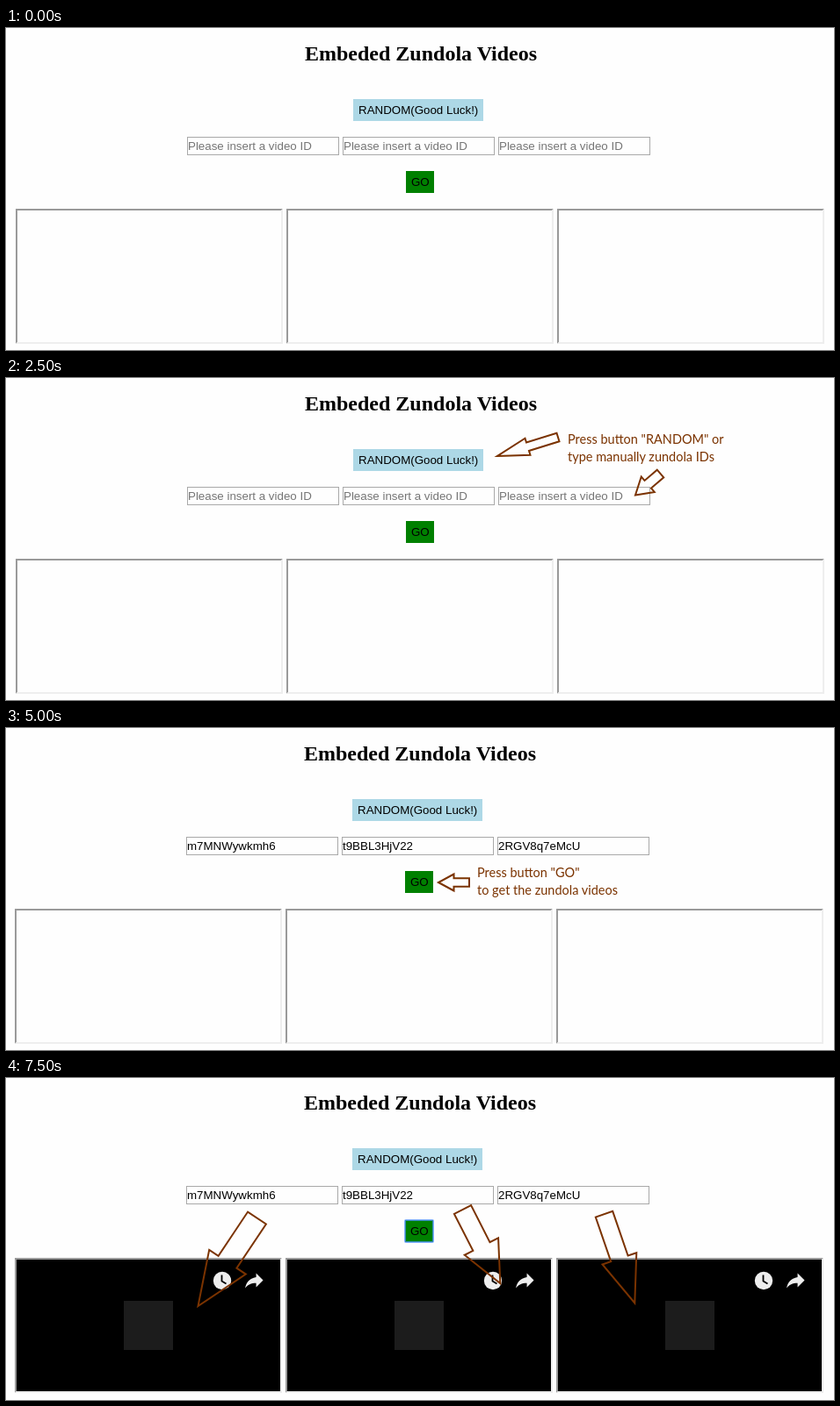
Recreate the animation shown at these times as an HTML page. Size 942 px wide and 367 px high, loop 10 s.

```html
<!DOCTYPE html>
<html lang="en">
<head>
<meta charset="utf-8">
<title>Embedded videos</title>
<style>
  html, body { margin: 0; width: 100%; height: 100%; overflow: hidden; background: #fefefe; }
  svg { display: block; width: 942px; height: 367px; }
  text { white-space: pre; }
  .title { font: bold 24px "Liberation Serif", "Times New Roman", serif; }
  .ui { font: 13.333px "Liberation Sans", Arial, sans-serif; }
  .hint { fill: #757575; }
  .note { font: 14.5px Lato, sans-serif; fill: #7b3300; }
  .arrow { fill: none; stroke: #7b3300; stroke-width: 2; }
  .field { fill: none; stroke: #a9a9a9; }
  .focus { fill: none; stroke: #4d90fe; stroke-width: 2; stroke-opacity: .7; }
  .icon { fill: #eee; }
  .hands { fill: none; stroke: #000; stroke-width: 1.8; }
</style>
</head>
<body>
<svg id="stage" viewBox="0 0 942 367"></svg>
<script>
const NS = "http://www.w3.org/2000/svg";
const STEP = 2500, STEPS = 4;
const IDS = ["m7MNWywkmh6", "t9BBL3HjV22", "2RGV8q7eMcU"];
const FRAME_W = 304, FRAME_H = 154, BORDER = 2, GAP = 4;
const FIELD_W = 173, FIELD_H = 21, BUTTON_H = 25;

function add(parent, tag, attrs = {}, content) {
  const el = document.createElementNS(NS, tag);
  for (const key in attrs) el.setAttribute(key, attrs[key]);
  if (content) el.textContent = content;
  return parent.appendChild(el);
}
const group = parent => add(parent, "g");
const label = (parent, x, y, cls, content) => add(parent, "text", { x, y, class: cls }, content);
const rect = (parent, x, y, width, height, attrs) => add(parent, "rect", { x, y, width, height, ...attrs });
const path = (parent, d, attrs) => add(parent, "path", { d, ...attrs });

function button(x, y, width, fill, content) {
  rect(page, x, y, width, BUTTON_H, { fill });
  label(page, x + 6, y + 17, "ui", content);
}

function note(parent, x, y, lines) {
  lines.forEach((line, i) => label(parent, x, y + 20 * i, "note", line));
}

// Block arrow: the head takes half the length and is twice as wide as the shaft
function arrow(parent, tipX, tipY, tailX, tailY, width) {
  const dx = tailX - tipX, dy = tailY - tipY, len = Math.hypot(dx, dy);
  const at = (along, side) => [
    tipX + dx * along - dy / len * side * width,
    tipY + dy * along + dx / len * side * width
  ];
  const points = [at(0, 0), at(.5, 1), at(.5, .5), at(1, .5), at(1, -.5), at(.5, -.5), at(.5, -1)];
  add(parent, "polygon", { points: points.join(" "), class: "arrow" });
}

// Dark top and left, light bottom and right, mitred corners
function insetFrame(x, y) {
  const b = BORDER, w = FRAME_W, h = FRAME_H, inner = h - 2 * b;
  path(page, `M${x} ${y + h}V${y}h${w}l${-b} ${b}H${x + b}v${inner}z`, { fill: "#9a9a9a" });
  path(page, `M${x} ${y + h}h${w}V${y}l${-b} ${b}v${inner}H${x + b}z`, { fill: "#eee" });
}

function player(x, y) {
  const mark = 56;
  rect(players, x + BORDER, y + BORDER, FRAME_W - 2 * BORDER, FRAME_H - 2 * BORDER);
  rect(players, x + (FRAME_W - mark) / 2, y + (FRAME_H - mark) / 2, mark, mark, { fill: "#1c1c1c" });
  add(players, "circle", { cx: x + 236, cy: y + 26, r: 10.2, class: "icon" });
  path(players, `M${x + 235.5} ${y + 19.5}v7l5 3`, { class: "hands" });
  path(players, "M14 9V5l7 7-7 7v-4.1c-5 0-8.5 1.6-11 5.1 1-5 4-10 11-11z",
    { class: "icon", transform: `translate(${x + 258.6} ${y + 11.8}) scale(1.14)` });
}

const stage = document.getElementById("stage");
const page = group(stage);
label(page, 340, 37, "title", "Embeded Zundola Videos");
button(395, 81, 148, "#add8e6", "RANDOM(Good Luck!)");
button(455, 163, 32, "#008000", "GO");
const focusRing = rect(page, 455, 163, 32, BUTTON_H, { class: "focus", rx: 1 });

const hints = group(page), values = group(page), players = group(page);
IDS.forEach((id, i) => {
  const x = 206 + (FIELD_W + GAP) * i, frameX = 11 + (FRAME_W + GAP) * i;
  rect(page, x + .5, 124.5, FIELD_W - 1, FIELD_H - 1, { class: "field" });
  label(hints, x + 1, 139, "ui hint", "Please insert a video ID");
  label(values, x + 1, 139, "ui", id);
  insetFrame(frameX, 206);
  player(frameX, 206);
});

const startNotes = group(stage);
note(startNotes, 639, 75, ['Press button "RANDOM" or', "type manually zundola IDs"]);
arrow(startNotes, 559, 89, 628, 67.5, 10);
arrow(startNotes, 716, 133.5, 744.5, 109, 11.5);

const goNotes = group(stage);
note(goNotes, 536, 170, ['Press button "GO"', "to get the zundola videos"]);
arrow(goNotes, 492, 176, 527, 176, 9.5);

const resultArrows = group(stage);
arrow(resultArrows, 218.5, 260, 285.5, 159.5, 25);
arrow(resultArrows, 562.3, 234, 519.5, 150, 21.5);
arrow(resultArrows, 715.3, 256.5, 680.5, 155.2, 20.5);

const show = (el, on) => el.setAttribute("visibility", on ? "visible" : "hidden");

function draw(ms) {
  const step = Math.floor(ms / STEP) % STEPS;
  const filled = step >= 2, playing = step === 3;
  page.setAttribute("transform", `translate(${filled ? -1 : 0} ${playing ? -1 : 0})`);
  show(hints, !filled);
  show(values, filled);
  show(startNotes, step === 1);
  show(goNotes, step === 2);
  for (const el of [players, focusRing, resultArrows]) show(el, playing);
}

const start = performance.now();
function tick() {
  draw(performance.now() - start);
  requestAnimationFrame(tick);
}
tick();
</script>
</body>
</html>
```
